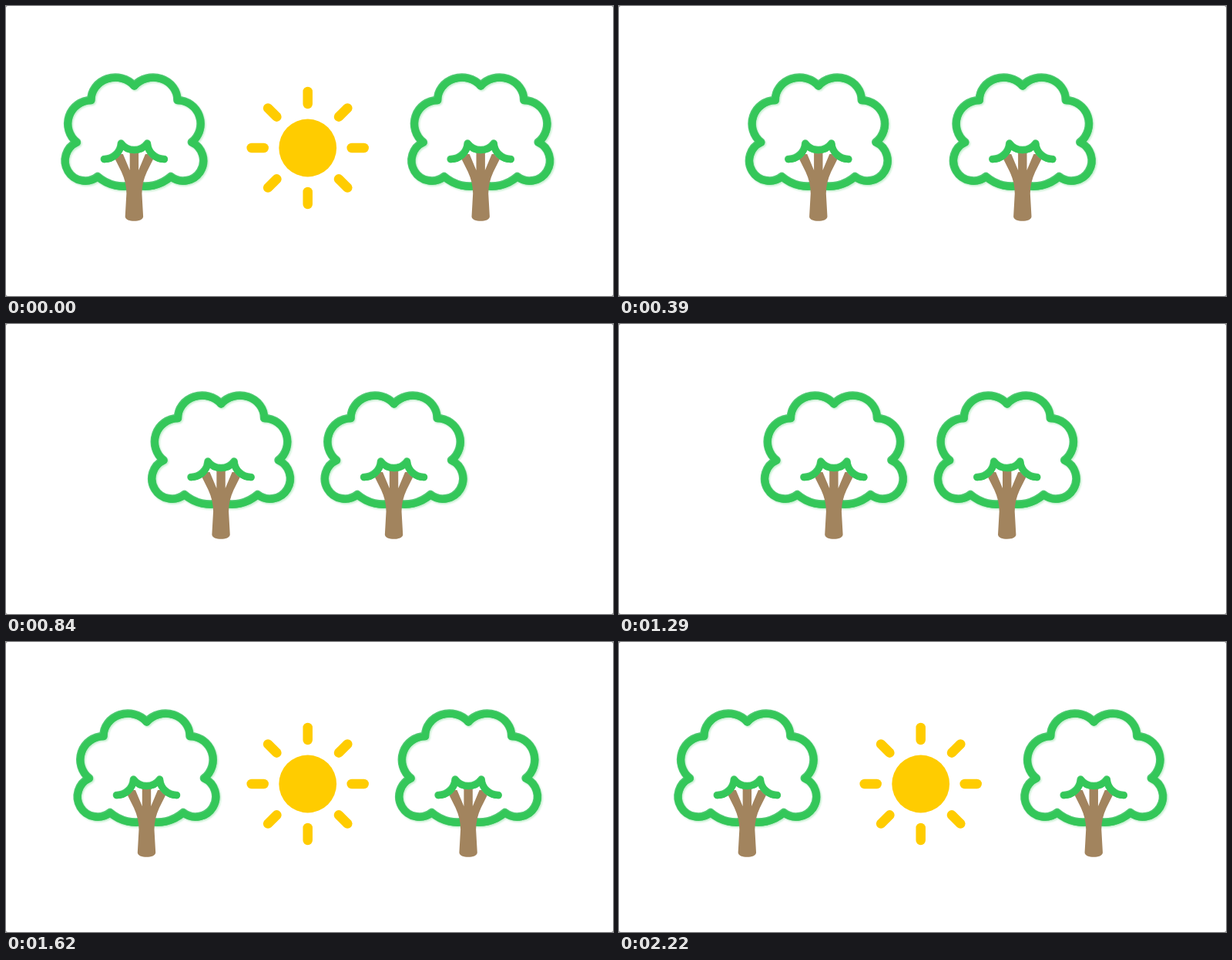
Animation of 788 by 376 pixels, one loop 2250 ms. Source, as an HTML page:

```html
<!DOCTYPE html>
<html lang="en">
<head>
<meta charset="utf-8">
<title>Trees and sun</title>
<style>
  html, body { margin: 0; width: 100%; height: 100%; overflow: hidden; background: #8a8a8a; }
  svg { display: block; width: 100vw; height: 100vh; }
  .line { fill: none; stroke-linecap: round; stroke-linejoin: round; }
</style>
</head>
<body>
<svg viewBox="0 0 788 376">
  <defs>
    <filter id="soft" x="-10%" y="-10%" width="120%" height="120%">
      <feGaussianBlur stdDeviation="0.8"/>
    </filter>
    <!-- One arc per lobe, mirrored about the trunk. -->
    <path id="half" d="M0 103.3A31.5 29 0 0 0-56 122A30.5 30.5 0 0 0-74.5 176.5
      A26.2 26.2 0 1 0-47.5 221A51 51 0 0 0 0 231.6"/>
    <g id="crown" class="line">
      <use href="#half"/>
      <use href="#half" transform="scale(-1 1)"/>
    </g>
    <path id="leaves" class="line" d="M-39 198.5A22 22 0 0 0-17 178A21.2 21.2 0 0 0 17 178A22 22 0 0 0 39 198.5"/>
    <g id="tree">
      <use href="#crown" transform="translate(1.5 1.8)" stroke="#34c759" opacity=".3" stroke-width="10.4" filter="url(#soft)"/>
      <use href="#crown" stroke="#50c973" stroke-width="10.6"/>
      <use href="#crown" transform="translate(.4 .7)" stroke="#34c759" stroke-width="9"/>
      <path fill="#a2845e" d="M-28 192L-16.5 215Q-10 229-10 243L-11.7 273C-11.7 280.8 11.7 280.8 11.7 273L10 243
        Q10 229 16.5 215L28 192L14.5 192L5.7 213V188H-5.7V213L-14.5 192Z"/>
      <use href="#leaves" stroke="#4acb6d" stroke-width="9.6"/>
      <use href="#leaves" transform="translate(.3 .5)" stroke="#34c759" stroke-width="8.4"/>
    </g>
  </defs>
  <rect width="788" height="376" rx="2.5" fill="#fff"/>
  <use id="left" href="#tree"/>
  <g transform="translate(391.7 184)">
    <circle id="disc" r="37.4" fill="#fc0"/>
    <g id="rays" class="line" stroke="#fc0" stroke-width="12.5"></g>
  </g>
  <use id="right" href="#tree"/>
</svg>
<script>
const LOOP = 2250, CLOSE = 119, OPEN = 1327;
const CENTER = 391.3, WIDE = 224.9, NARROW = 112.4;
const $ = id => document.getElementById(id);
const clamp = v => Math.min(1, Math.max(0, v));

$('rays').innerHTML = Array.from({ length: 8 }, (_, i) =>
  `<path d="M57 0H73" transform="rotate(${i * 45})"/>`).join('');

// Slightly underdamped spring from 0 to 1.
function spring(ms) {
  if (ms <= 0) return 0;
  const damping = 0.9, root = Math.sqrt(1 - damping ** 2), x = 0.0104 * ms;
  return 1 - Math.exp(-damping * x) * (Math.cos(root * x) + damping / root * Math.sin(root * x));
}

function showSunPart(el, t, delay) {
  const leave = clamp((t - CLOSE) / 162);
  const enter = clamp((t - OPEN - delay) / 236);
  const entering = t >= OPEN;
  const scale = entering ? 1 - 0.25 * (1 - enter) ** 2 : 1 - 0.25 * leave;
  el.setAttribute('transform', `scale(${scale})`);
  el.setAttribute('opacity', entering ? enter : 1 - leave);
}

function render(t) {
  const closed = spring(t - CLOSE) - spring(t - OPEN);
  const gap = WIDE + (NARROW - WIDE) * closed;
  $('left').setAttribute('transform', `translate(${CENTER - gap} 0)`);
  $('right').setAttribute('transform', `translate(${CENTER + gap} 0)`);
  showSunPart($('disc'), t, 0);
  showSunPart($('rays'), t, 34);
}

const began = performance.now();
function tick() {
  render((performance.now() - began) % LOOP);
  requestAnimationFrame(tick);
}
tick();
</script>
</body>
</html>
```
